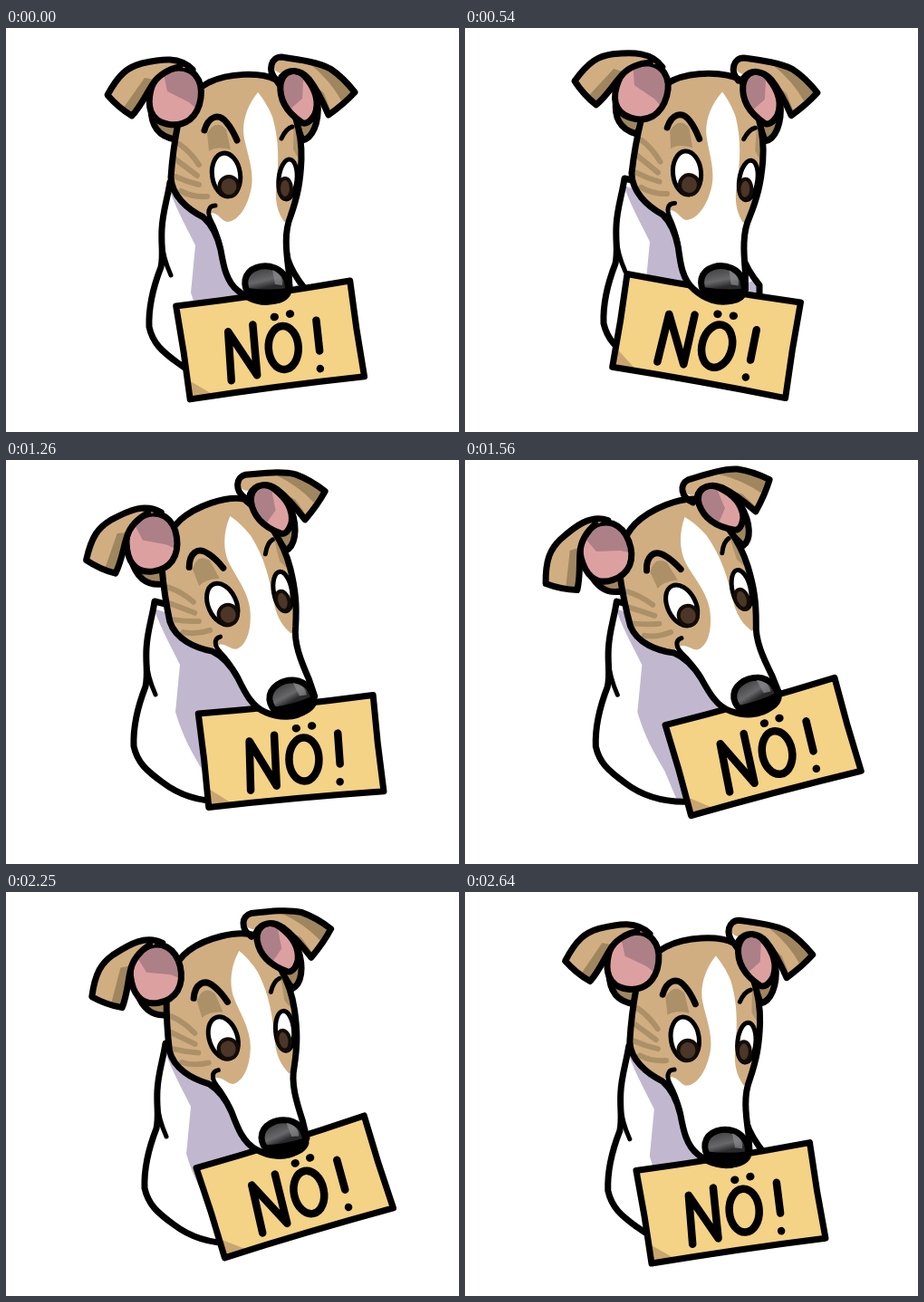
Animation, 500 px wide and 446 px high, one loop 2670 ms. Source, as an HTML page:

```html
<!DOCTYPE html>
<html lang="de">
<head>
<meta charset="utf-8">
<title>NÖ!</title>
<style>
  html, body { margin: 0; height: 100%; overflow: hidden; background: #fff; }
  svg { display: block; width: 100%; height: 100%; }
  .line { stroke: #000; stroke-width: 7; stroke-linejoin: round; stroke-linecap: round; }
  .thin { stroke-width: 5; }
  .open { fill: none; }
  .tan { fill: #d0ae82; }
  .shade { fill: #a0865f; }
  .streak { fill: none; stroke: #a0865f; stroke-width: 6; stroke-linecap: round; opacity: .75; }
  .pink { fill: #dda0a1; }
  .mauve { fill: #ad8088; }
  .white { fill: #fff; }
  .iris { fill: #4b3627; stroke: #120c08; stroke-width: 4; }
</style>
</head>
<body>
<svg viewBox="0 0 500 446">
  <defs>
    <path id="skull" d="M224 60C245 50 280 48 298 57C318 85 327 115 326 145C325 170 322 185 314 208C307 225 309 245 312 268L313 288L300 300C285 306 268 300 256 290C243 280 240 262 237 245C234 232 228 218 218 209C200 200 183 185 182 165C184 135 187 120 190 105C195 85 205 70 224 60Z"/>
    <path id="chest" d="M181 170C178 190 173 202 172 222C171 240 174 250 171 264C164 282 157 305 158 330C162 348 172 357 190 370C207 383 230 391 256 391L330 330V288C322 278 315 268 311 255L300 200Z"/>
    <path id="pinkL" d="M160 68C166 45 195 36 209 52C220 65 216 90 203 101C190 111 166 108 160 92C157 84 158 76 160 68Z"/>
    <path id="pinkR" d="M303 62C306 46 322 42 332 56C343 70 345 84 341 95C336 104 330 107 326 104C313 95 301 82 303 62Z"/>
    <clipPath id="inSkull"><use href="#skull"/></clipPath>
    <clipPath id="inChest"><use href="#chest"/></clipPath>
    <clipPath id="inPinkL"><use href="#pinkL"/></clipPath>
    <clipPath id="inPinkR"><use href="#pinkR"/></clipPath>
    <linearGradient id="noseFill" x2=".3" y2="1">
      <stop offset=".1" stop-color="#3c3c3e"/><stop offset=".5" stop-color="#68686b"/><stop offset=".7" stop-color="#29292b"/>
    </linearGradient>
  </defs>

  <g id="body">
    <use href="#chest" class="white"/>
    <path clip-path="url(#inChest)" fill="#c1b8d0" d="M180 178C190 205 202 225 209 240L204 292C212 320 223 338 234 357L250 395H340V275L318 285L250 200Z"/>
    <use href="#chest" class="line open"/>
    <path class="line open thin" d="M172 235C173 250 177 262 182 273"/>
  </g>

  <g id="sign">
    <path fill="#f4d286" d="M-97-52L97-53L98 54L-96 52Z"/>
    <path fill="#c9a670" d="M-96 30L-68 52H-96Z"/>
    <path class="line open" d="M-97-52Q0-50 97-53Q96 0 98 54Q0 51-96 52Q-95 0-97-52Z"/>
    <g class="line open" style="stroke-width:8.5">
      <path d="M-48 38L-44-16L-19 36L-16-20M54-15L53 19M51 38.5v.1"/>
      <ellipse cx="14" cy="10" rx="16.5" ry="24" transform="rotate(5 14 10)"/>
      <path d="M8.500-25h.8M26-26h.8"/>
    </g>
  </g>

  <g id="head">
    <g class="earL"><path class="line shade" d="M160 88C160 108 168 120 187 123L200 98Z"/></g>
    <g class="earR"><path class="line shade" d="M344 82C346 105 338 122 327 124L318 98Z"/></g>

    <use href="#skull" class="tan"/>
    <g clip-path="url(#inSkull)">
      <path class="shade" opacity=".75" d="M222 116Q232 100 243 112L248 134Q232 130 224 136Z"/>
      <path class="streak" d="M191 128Q203 136 213 151M187 145Q198 153 211 163M187 164Q200 170 213 173M193 180Q206 187 222 186"/>
      <path class="shade" opacity=".7" d="M318 96L334 110L326 150L317 134Z"/>
      <path class="white" d="M278 71C264 88 260 108 263 122C267 142 276 162 269 184C264 202 254 214 244 214C238 213 236 206 228 204L216 207L220 320H330V205L307 214C301 205 297 195 298 178C301 150 302 125 294 98C290 88 284 78 278 71Z"/>
    </g>
    <use href="#skull" class="line open"/>

    <path class="line open" d="M219 113C223 99 234 92 244 105C249 111 252 117 255 124"/>
    <path class="line open thin" d="M304 122Q309 111 316 109"/>
    <path class="line open thin" d="M231 196C223 196 222 204 226 212Q233 225 237 242"/>

    <ellipse class="line white thin" cx="243" cy="162" rx="15.500" ry="24" transform="rotate(-8 243 162)"/>
    <ellipse class="iris" cx="246" cy="175" rx="10.500" ry="11"/>
    <ellipse class="line white thin" cx="311" cy="167" rx="10" ry="22" transform="rotate(6 311 167)"/>
    <ellipse class="iris" cx="308" cy="177" rx="7" ry="11"/>

    <path class="line" fill="url(#noseFill)" d="M264 278C267 264 284 260 297 265C309 270 313 282 311 293C305 304 279 304 269 295C265 290 263 285 264 278Z"/>
    <path d="M266 287Q290 290 311 287L310 296Q289 307 269 295Z"/>
    <path d="M294 267Q306 272 305 284L297 283Z" fill="#8b8b8e" opacity=".7"/>

    <g class="earL">
      <use href="#pinkL" class="pink"/>
      <path clip-path="url(#inPinkL)" class="mauve" d="M172 40H220V98L202 82L178 70Z"/>
      <use href="#pinkL" class="line open"/>
      <path class="tan" d="M200 40C190 32 172 34 150 39C135 43 125 50 112 74L139 97C150 85 155 72 162 62C170 50 185 44 200 44Z"/>
      <path class="shade" d="M153 55L164 57L139 95L129 89Z"/>
      <path class="line open" d="M206 46C192 31 172 34 150 39C135 43 125 50 112 74Q124 88 139 97C150 85 155 72 162 62C168 52 180 45 192 43"/>
    </g>
    <g class="earR">
      <use href="#pinkR" class="pink"/>
      <path clip-path="url(#inPinkR)" class="mauve" d="M300 42H329L327 78L311 92L298 80Z"/>
      <use href="#pinkR" class="line open"/>
      <path class="tan" d="M303 50C290 46 293 32 304 32C325 35 345 38 358 45C370 53 378 62 385 71L356 96C350 82 342 66 334 56C325 47 312 45 303 50Z"/>
      <path class="shade" d="M336 40L358 47L382 71L370 80Q358 58 336 40ZM340 62L351 72L358 90L354 93Z"/>
      <path class="line open" d="M298 57C288 46 293 32 304 32C325 35 345 38 358 45C370 53 378 62 385 71Q373 84 356 96C350 82 342 66 334 56C325 46 312 44 304 54"/>
    </g>
  </g>
</svg>
<script>
const LOOP = 2670, STEP = 30;

// time, head x, y, angle, left ear, right ear, body x, y, sign x, y, angle
const poses = [
  [0,    243, 163, 0,     0,   0,   0,   0,   291, 345, -8],
  [280,  245, 166, 2.5,   2,   -2,  -1,  1,   277, 350, 3.5],
  [540,  245, 161, 2.5,   5,   -3,  -5,  -4,  266, 339, 9.6],
  [900,  239, 162, -12,   11,  9,   -12, -12, 296, 329, 3.5],
  [1260, 239, 160, -16,   0,   2,   -17, -14, 314, 322, -5.8],
  [1860, 240, 163, -20,   -17, -13, -9,  -12, 337, 315, -22.5],
  [2250, 240, 162, -10.7, -10, -4,  -5,  -3,  318, 326, -17],
];

function poseAt(i) {
  const n = poses.length, turns = Math.floor(i / n);
  const [time, ...values] = poses[i - turns * n];
  return [time + turns * LOOP, ...values];
}

// Smooth cyclic curve through all poses
function blend(t) {
  const i = poses.findLastIndex(p => p[0] <= t);
  const [a, b, c, d] = [i - 1, i, i + 1, i + 2].map(poseAt);
  const span = c[0] - b[0], u = (t - b[0]) / span, v = 1 - u;
  return b.map((_, k) => {
    const m0 = (c[k] - a[k]) / (c[0] - a[0]) * span;
    const m1 = (d[k] - b[k]) / (d[0] - b[0]) * span;
    return v * v * (1 + 2 * u) * b[k] + u * u * (3 - 2 * u) * c[k] + u * v * (v * m0 - u * m1);
  });
}

function place(selector, transform) {
  document.querySelectorAll(selector).forEach(el => el.setAttribute('transform', transform));
}

function draw(now) {
  const t = Math.floor(now % LOOP / STEP) * STEP;
  const [, hx, hy, tilt, earL, earR, bx, by, sx, sy, swing] = blend(t);
  place('#head', `translate(${hx} ${hy}) rotate(${tilt}) translate(-243 -163)`);
  place('.earL', `rotate(${earL} 205 100)`);
  place('.earR', `rotate(${earR} 310 110)`);
  place('#body', `translate(${bx} ${by})`);
  place('#sign', `translate(${sx} ${sy}) rotate(${swing})`);
  requestAnimationFrame(draw);
}
requestAnimationFrame(draw);
</script>
</body>
</html>
```
